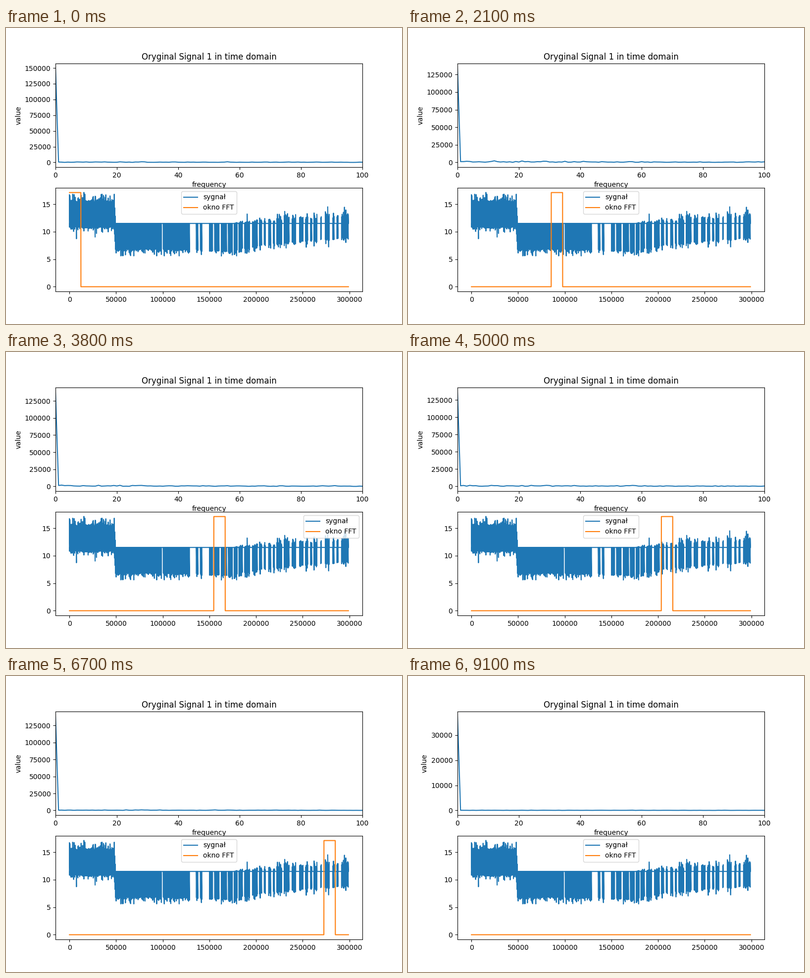
A matplotlib script that plays this animation: 800 px wide and 600 px high, repeating every 9200 ms.

```python
import numpy as np
import matplotlib.pyplot as plt
from matplotlib.animation import FuncAnimation

FRAMES, INTERVAL = 92, 100
HOP = 4070
WINDOW = 3 * HOP
SHOWN = 299000      # samples drawn in the lower plot
RECORDED = 373658   # samples the spectrum runs through
PEAK, REST = 17.112, 11.5


def active_stretches(rng):
    """Yield start and end of each noisy stretch; pauses grow with time."""
    yield from [(0, 98900), (100600, 129100), (136100, 137800), (140400, 142200)]
    pos = 150300
    while pos < SHOWN - 7000:
        age = (pos - 150000) / 150000
        end = pos + rng.uniform(500, 6000 - 1500 * age)
        yield pos, end
        pos = end + 1500 + rng.uniform(300, 800 + 3500 * age)
    yield SHOWN - 4300, SHOWN


def make_signal():
    rng = np.random.default_rng(4)
    keys = np.array([0, 48, 49.5, 175, 215, 299]) * 1000
    top = [15.4, 15.4, REST, REST, 11.8, 12.7]
    top_noise = [0.35, 0.35, 0, 0, 0.5, 0.5]
    bottom = [11, 11, 7, 6.7, 7.9, 9.1]
    points = [(15500, REST), (15500, PEAK)]
    for start, end in active_stretches(rng):
        points.append((start, REST))
        for x in np.arange(start, end, 500):
            rise = np.interp(x, keys, top_noise) * rng.exponential()
            fall = 0.35 * rng.exponential()
            points.append((x, max(np.interp(x, keys, bottom) - fall, 5.6)))
            points.append((x, min(np.interp(x, keys, top) + rise, PEAK - 0.3)))
        points.append((end, REST))
    points.sort(key=lambda p: p[0])
    return np.array(points).T


def mean_level(x):
    """Local average of the recorded signal."""
    keys = np.array([52.9, 53, 95, 110, 135, 161, 210, 250, 300]) * 1000
    return np.interp(x, keys, [12.256, 10.97, 10.97, 10.83, 11.5,
                               11.257, 11.136, 11.251, 11.423])


def spectrum(k):
    rng = np.random.default_rng(100 + k)
    f = np.arange(102)
    start = k * HOP
    length = min(WINDOW, RECORDED - start)
    noise = np.interp(k, [0, 25, 50, 75], [600, 1100, 900, 230]) * length / WINDOW
    hum = np.exp(-((f - 28) / 1.6) ** 2) + 0.5 * np.exp(-((f - 56) / 1.6) ** 2)
    mags = noise * (rng.rayleigh(0.7, f.size) / (1 + f / 90) + hum)
    mags[0] = length * mean_level(np.linspace(start, start + length, 400)).mean()
    return f, mags


fig, (freq_ax, time_ax) = plt.subplots(2, 1, figsize=(8, 6), dpi=100)
fig.subplots_adjust(left=0.125, right=0.9, bottom=0.11, top=0.88, hspace=0.2)

spectrum_line, = freq_ax.plot([], [])
freq_ax.set(title="Oryginal Signal 1 in time domain",
            xlabel="frequency", ylabel="value", xlim=(0, 100))

samples = np.arange(0, SHOWN + 1, 50)
time_ax.plot(*make_signal(), label="sygnał")
window_line, = time_ax.plot(samples, 0 * samples, label="okno FFT")
time_ax.set(xlim=(-0.05 * SHOWN, 1.05 * SHOWN), ylim=(-0.05 * PEAK, 1.05 * PEAK))
legend = time_ax.legend(loc="upper center")


def update(k):
    f, mags = spectrum(k)
    spectrum_line.set_data(f, mags)
    freq_ax.set_ylim(-0.05 * mags[0], 1.05 * mags[0])
    start = k * HOP
    inside = (samples >= start) & (samples < start + WINDOW)
    window_line.set_ydata(np.where(inside, PEAK, 0))
    # The legend steps aside while the window passes beneath it.
    covered = start + WINDOW > 120000 and start < 179000
    legend.set_loc("upper right" if covered else "upper center")
    return spectrum_line, window_line, legend


anim = FuncAnimation(fig, update, frames=FRAMES, interval=INTERVAL,
                     repeat=True, repeat_delay=0)
plt.show()
```
